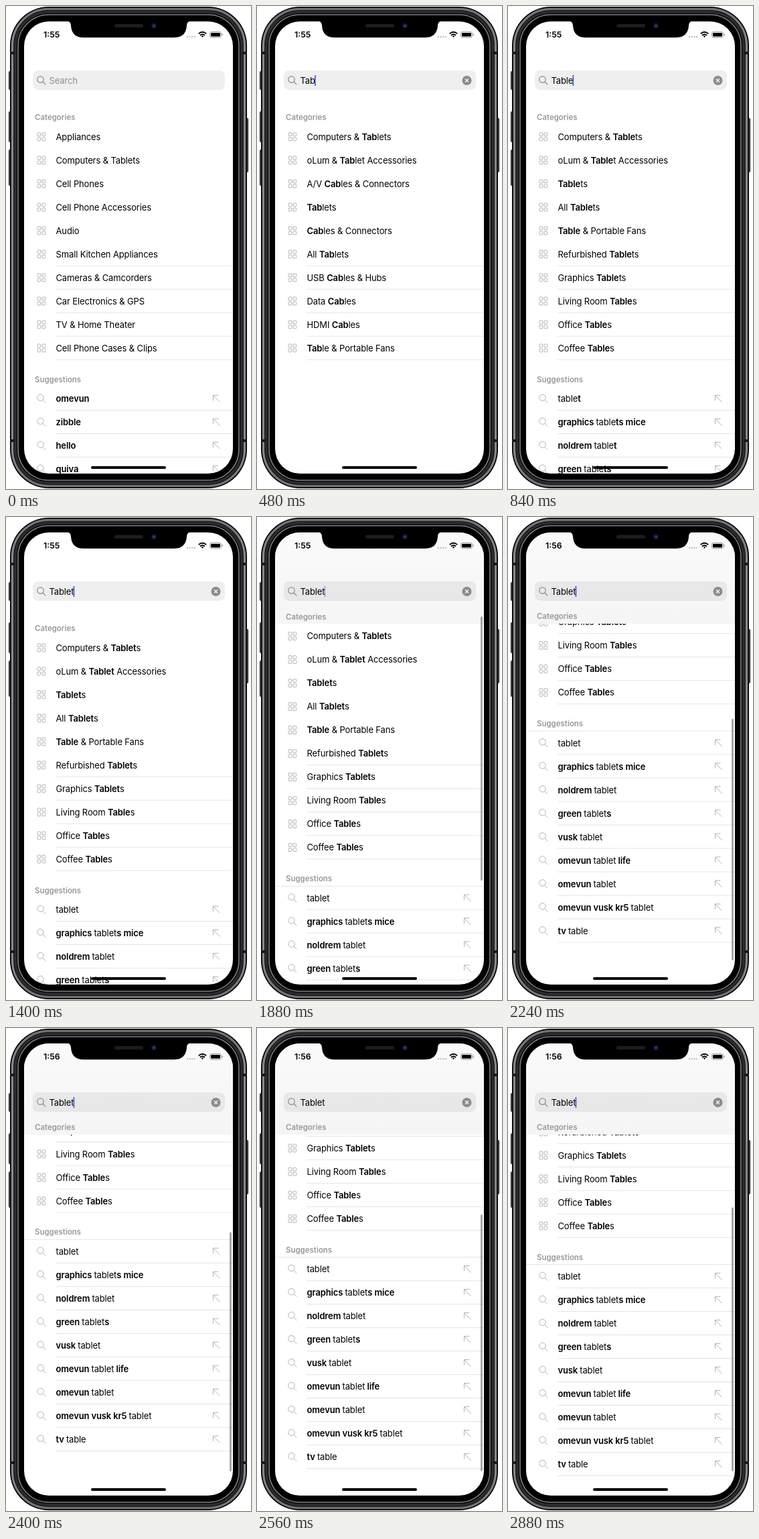
Recreate the animation shown at these times as an HTML page. Size 366 by 720 pixels, loop 2.92 s.

```html
<!DOCTYPE html>
<html lang="en">
<head>
<meta charset="utf-8">
<title>Search as you type</title>
<style>
  html, body { margin: 0; width: 100%; height: 100%; overflow: hidden; background: #fff; }
  svg { display: block; width: 100vw; height: 100vh; }
  text { font: 13px Inter, "Open Sans", sans-serif; letter-spacing: -.01em; white-space: pre; }
  .bold { font-weight: 600; }
  .head { font-size: 11.4px; font-weight: 600; letter-spacing: .003em; fill: #98989b; }
  .icon { fill: none; stroke: #b2b2b5; }
  .line { stroke: #c8c8ca; stroke-width: .5; }
</style>
</head>
<body>
<svg viewBox="0 0 366 720">
  <defs>
    <clipPath id="screen"><rect x="27" y="23" width="312" height="674" rx="37"/></clipPath>
    <linearGradient id="steel" x2="0" y2="1">
      <stop stop-color="#6f7072"/><stop offset=".08" stop-color="#88898c"/>
      <stop offset=".92" stop-color="#88898c"/><stop offset="1" stop-color="#6f7072"/>
    </linearGradient>
    <linearGradient id="bar" x2="0" y2="1">
      <stop stop-color="#fafafa"/><stop offset="1" stop-color="#f5f5f5"/>
    </linearGradient>
    <g id="grid" class="icon">
      <rect x="47" y="-6" width="4.8" height="4.8" rx="1"/><rect x="54" y="-6" width="4.8" height="4.8" rx="1"/>
      <rect x="47" y="1" width="4.8" height="4.8" rx="1"/><rect x="54" y="1" width="4.8" height="4.8" rx="1"/>
    </g>
    <g id="lens"><circle cx="51.5" cy="-1.5" r="4.7"/><path d="M55 2l4.3 4.3"/></g>
    <path id="arrow" class="icon" d="M309.5 3v-8h8M309.5 -5l10 10"/>
  </defs>

  <g fill="#5a5b5e" stroke="#111">
    <rect x="4.5" y="97.5" width="4" height="27" rx="1"/>
    <rect x="4.5" y="157.5" width="4" height="45" rx="1"/>
    <rect x="4.5" y="214.5" width="4" height="53" rx="1"/>
    <rect x="357.5" y="167.5" width="4" height="80" rx="1"/>
  </g>
  <rect x="6" y="1" width="354" height="718" rx="58"/>
  <rect x="9.5" y="4.5" width="347" height="711" rx="54.5" fill="none" stroke="url(#steel)" stroke-width="3.4"/>
  <rect x="14" y="9" width="338" height="702" rx="50" fill="none" stroke="#2b2b2d" stroke-width="4"/>
  <rect x="18" y="13" width="330" height="694" rx="46" stroke="#828386" stroke-width="1.6"/>
  <path d="M6 70h7M353 70h7M6 648h7M353 648h7" stroke="#18181a" stroke-width="4"/>

  <g clip-path="url(#screen)">
    <rect x="27" y="23" width="312" height="674" fill="#fff"/>
    <g id="list"></g>
    <rect id="topbar" x="27" y="23" width="312" height="136" fill="url(#bar)"/>
    <text id="sticky" class="head" x="43">Categories</text>
    <rect id="thumb" x="334" width="3" rx="1.5" fill="#000" opacity=".35"/>

    <rect x="40" y="96" width="287" height="29" rx="8" fill="#767678" fill-opacity=".115"/>
    <use href="#lens" y="111" fill="none" stroke="#87878b" stroke-width="1.2"/>
    <text id="query" x="64.5" y="115.7"></text>
    <rect id="caret" y="103" width="1.7" height="16" fill="#3b5bdb"/>
    <g id="clear">
      <circle cx="313.5" cy="111" r="7" fill="#8b8b8f"/>
      <path d="M311 108.5l5 5m0-5l-5 5" stroke="#fff" stroke-width="1.2"/>
    </g>

    <text id="clock" class="bold" x="56" y="47.2" style="font-size:12.4px;letter-spacing:0"></text>
    <path d="M270 46h13" stroke="#bbb" stroke-width="2" stroke-dasharray="2 1.6"/>
    <g fill="none" stroke="#000" stroke-width="1.9">
      <path d="M287.8 41.2q5.7-4.8 11.4 0M289.9 43.7q3.6-3 7.2 0"/>
      <path d="M293.5 47l-1.8-2q1.8-1.3 3.6 0z" fill="#000" stroke="none"/>
      <rect x="304.5" y="38.5" width="17" height="8.5" rx="2.5" stroke="#999" stroke-width="1"/>
      <rect x="306" y="40" width="14" height="5.5" rx="1.3" fill="#000" stroke="none"/>
      <path d="M323.3 41.3v3" stroke="#999" stroke-width="1.2"/>
    </g>
    <rect x="127" y="686" width="112" height="4" rx="2"/>
  </g>

  <path d="M90 22q7 1 7 7 1 18 19 18h135q18 0 19-18 0-6 7-7z"/>
  <rect x="162" y="27" width="43" height="5" rx="2.5" fill="#1d1d1f"/>
  <circle cx="221" cy="29.5" r="4" fill="#10162c"/>
  <circle cx="221" cy="29.5" r="1.9" fill="#25407c"/>
</svg>
<script>
const LOOP = 2920, ROW = 35, REST = 214.5;
const $ = id => document.getElementById(id);

const start = {
  categories: ['Appliances', 'Computers & Tablets', 'Cell Phones', 'Cell Phone Accessories', 'Audio',
    'Small Kitchen Appliances', 'Cameras & Camcorders', 'Car Electronics & GPS', 'TV & Home Theater',
    'Cell Phone Cases & Clips'],
  suggestions: ['omevun', 'zibble', 'hello', 'quiva']
};
const early = {
  categories: ['Computers & Tablets', 'oLum & Tablet Accessories', 'A/V Cables & Connectors', 'Tablets',
    'Cables & Connectors', 'All Tablets', 'USB Cables & Hubs', 'Data Cables', 'HDMI Cables',
    'Table & Portable Fans'],
  suggestions: []
};
const late = {
  categories: ['Computers & Tablets', 'oLum & Tablet Accessories', 'Tablets', 'All Tablets',
    'Table & Portable Fans', 'Refurbished Tablets', 'Graphics Tablets', 'Living Room Tables',
    'Office Tables', 'Coffee Tables'],
  suggestions: ['tablet', 'graphics tablets mice', 'noldrem tablet', 'green tablets', 'vusk tablet',
    'omevun tablet life', 'omevun tablet', 'omevun vusk kr5 tablet', 'tv table']
};

// Times at which each further letter is typed, and at which its results arrive
const typedAt = [80, 360, 440, 680, 760, 880];
const resultsAt = [160, 400, 480, 720, 840, 960];
const countUntil = (times, t) => times.filter(at => t >= at).length;
const clamp = x => Math.max(0, Math.min(1, x));

const span = (text, bold) =>
  `<tspan${bold ? ' class="bold"' : ''}>${text.replace('&', '&amp;')}</tspan>`;

// Categories embolden the match, suggestions embolden everything else
function highlight(text, length, inverse) {
  const match = length ? text.match(/\b(tablet|table|cable)/i) : null;
  if (!match) return span(text, inverse);
  const from = match.index, to = from + Math.min(length, match[0].length);
  return span(text.slice(0, from), inverse) + span(text.slice(from, to), !inverse) +
    span(text.slice(to), inverse);
}

const row = (y, icons, label, line) => `<g transform="translate(0 ${y})">${icons}
  <text x="74.5" y="4.7">${label}</text>${line ? '<path class="line" d="M74 17.2h265"/>' : ''}</g>`;

function buildList(length) {
  const { categories, suggestions } = length < 1 ? start : length < 5 ? early : late;
  let html = categories.map((text, i) =>
    row(195 + ROW * i, '<use href="#grid"/>', highlight(text, length, false), i > 4)).join('');
  if (suggestions.length) {
    html += '<text class="head" x="43" y="560.5">Suggestions</text>' +
      '<path id="sectionLine" class="line" d="M27 567.5h312"/>';
  }
  return html + suggestions.map((text, i) =>
    row(585.3 + ROW * i, '<use href="#lens" class="icon"/><use href="#arrow"/>',
      highlight(text, length, true), true)).join('');
}

// A flick past the end, then a critically damped return
function scrollAt(t) {
  const from = 1861, peak = 2335, over = 46.5;
  if (t < peak) return (REST + over) * Math.sin(clamp((t - from) / (peak - from)) * Math.PI / 2);
  const x = (t - peak) / 82.7;
  return REST + over * (1 + x) * Math.exp(-x);
}

function caretAt(t) {
  const ramp = (from, to) => clamp((t - from) / (to - from));
  return 1 - ramp(1400, 1560) + ramp(1800, 1960) - ramp(2390, 2550) + ramp(2740, 2870);
}

let shownLength = -1;

function draw(t) {
  const typed = 'Tablet'.slice(0, countUntil(typedAt, t));
  const length = countUntil(resultsAt, t);
  if (length !== shownLength) {
    $('list').innerHTML = buildList(length);
    shownLength = length;
  }

  const query = $('query');
  query.textContent = typed || 'Search';
  query.setAttribute('fill', typed ? '#000' : '#8e8e93');
  $('clear').setAttribute('opacity', typed ? 1 : 0);
  $('caret').setAttribute('x', 64.5 + query.getComputedTextLength() - .8);
  $('caret').setAttribute('opacity', typed ? caretAt(t) : 0);
  $('clock').textContent = t < 2200 ? '1:55' : '1:56';

  const scroll = scrollAt(t), shown = clamp(scroll / 18), over = Math.max(0, scroll - REST);
  const top = 138 + .6 * Math.min(scroll, REST) + over;
  $('list').setAttribute('transform', `translate(0 ${-scroll})`);
  $('topbar').setAttribute('opacity', shown);
  $('sticky').setAttribute('y', 170 - Math.min(18, scroll));
  $('sectionLine')?.setAttribute('opacity', shown);
  $('thumb').setAttribute('y', top);
  $('thumb').setAttribute('height', 394 - over);
  $('thumb').setAttribute('opacity', .35 * shown);
}

function tick() {
  draw(performance.now() % LOOP);
  requestAnimationFrame(tick);
}
tick();
</script>
</body>
</html>
```
